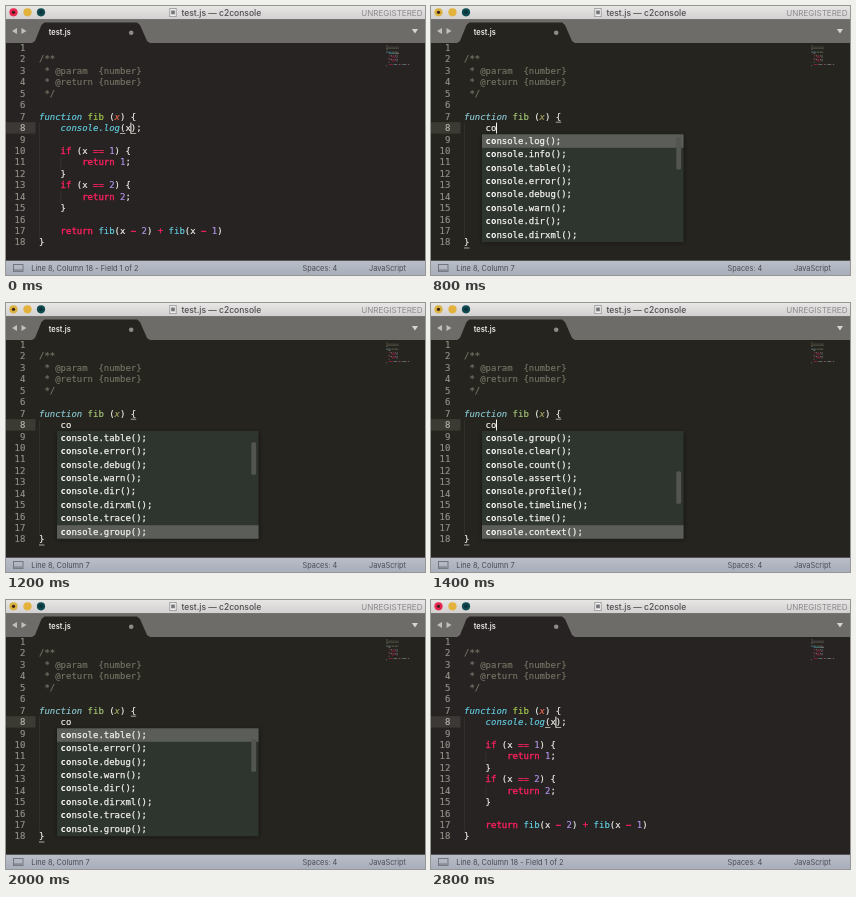
Recreate the animation shown at these times as an HTML page with a canvas. Size 419 by 269 pixels, loop 2900 ms.

```html
<!DOCTYPE html>
<html lang="en">
<head>
<meta charset="utf-8">
<title>Editor autocomplete</title>
<style>
html, body { margin: 0; width: 100%; height: 100%; overflow: hidden; background: #262421; }
canvas { display: block; width: 419px; height: 269px; }
</style>
</head>
<body>
<canvas id="stage"></canvas>
<script>
const W = 419, H = 269, LOOP = 2900, STEP = 100;
const canvas = document.getElementById('stage');
const ctx = canvas.getContext('2d');
const ratio = window.devicePixelRatio || 1;
canvas.width = W * ratio;
canvas.height = H * ratio;

const MONO = '"DejaVu Sans Mono", monospace';
const SANS = 'Inter, sans-serif';
const CHAR = 5.4, LINE = 11.44, LEFT = 33, FIRST = 41.8;

// The picture is warmer while the finished code shows, cooler while completing.
const base = { text: '#f2f2ec', pink: '#f3205c', violet: '#b394ec', comment: '#757364', lamp: '#0f4a50' };
const WARM = { ...base, back: '#272322', cyan: '#62d0e4', green: '#a9d050', arg: '#ee6a50', close: '#e8264f', gutter: '#3b3836' };
const COOL = { ...base, back: '#25241f', cyan: '#8ccbd6', green: '#a8c878', arg: '#a9a765', close: '#d9b13f', gutter: '#3b3b33' };
let C = WARM;

const source = [
  '', '/**', ' * @param  {number}', ' * @return {number}', ' */', '',
  'function fib (x) {', '', '',
  '    if (x == 1) {', '        return 1;', '    }',
  '    if (x == 2) {', '        return 2;', '    }', '',
  '    return fib(x − 2) + fib(x − 1)', '}'
];
const methods = ('log info table error debug warn dir dirxml trace group clear count ' +
  'assert profile timeline time context memory groupCollapsed groupEnd ' +
  'markTimeline profileEnd timelineEnd').split(' ');
const ROWS = 8, ROW = 13.4, POP = { x: 51, y: 128, w: 201.5 };

function rect(x, y, w, h, color) {
  ctx.fillStyle = color;
  ctx.fillRect(x, y, w, h);
}

function shape(points, color) {
  ctx.beginPath();
  points.forEach(([x, y]) => ctx.lineTo(x, y));
  ctx.closePath();
  ctx.fillStyle = color;
  ctx.fill();
}

function disc(x, y, r, color) {
  ctx.beginPath();
  ctx.arc(x, y, r, 0, Math.PI * 2);
  ctx.fillStyle = color;
  ctx.fill();
}

function fade(top, bottom, from, to) {
  const shade = ctx.createLinearGradient(0, top, 0, bottom);
  shade.addColorStop(0, from);
  shade.addColorStop(1, to);
  return shade;
}

function label(text, x, y, size, color, weight = 400, align = 'left') {
  ctx.font = `${weight} ${size}px ${SANS}`;
  ctx.textAlign = align;
  ctx.textBaseline = 'alphabetic';
  ctx.fillStyle = color;
  ctx.fillText(text, x, y);
}

function mono(text, x, middle, color, style = '', heavy = 0.15) {
  ctx.font = `${style} 8.97px ${MONO}`;
  ctx.textAlign = 'left';
  ctx.textBaseline = 'alphabetic';
  ctx.fillStyle = ctx.strokeStyle = color;
  ctx.fillText(text, x, middle + 3.2);
  if (heavy) {
    ctx.lineWidth = heavy;
    ctx.strokeText(text, x, middle + 3.2);
  }
}

const lineY = row => FIRST + row * LINE;
const colX = col => LEFT + col * CHAR;

function tokens(text, row) {
  if (row >= 1 && row <= 4) return [{ text, col: 0, color: C.comment }];
  const pattern = /function|console\.log|\bif\b|return|fib|==|[−+]|\d|\bx\b|[^\s]/g;
  return [...text.matchAll(pattern)].map(({ 0: word, index: col }) => {
    let color = C.text, style = '';
    if (/^(function|console)/.test(word)) [color, style] = [C.cyan, 'italic'];
    else if (/^(if|return|==|−|\+)$/.test(word)) color = C.pink;
    else if (word === 'fib') color = row === 6 ? C.green : C.cyan;
    else if (/\d/.test(word)) color = C.violet;
    else if (word === 'x' && row === 6) [color, style] = [C.arg, 'italic'];
    return { text: word, col, color, style };
  });
}

// Highlighted entry while the popup is open, driven by held arrow keys.
function selection(t) {
  if (t < 1000) return 0;
  if (t < 1100) return 1;
  if (t < 1500) return Math.round(1 + (t - 1000) * 0.0375);
  if (t < 1600) return 20;
  if (t < 1700) return 22;
  return Math.max(0, 17 - (t - 1700) / 20);
}

function scrollFor(t, chosen) {
  if (t < 1700) return Math.max(0, chosen - ROWS + 1);
  return Math.min(methods.length - ROWS, chosen);
}

function stateAt(t) {
  const s = { typed: 'console.log(x);', caret: 17, field: true, saved: t >= 300 && t < 600,
    popup: t >= 700 && t < 2300, blink: true };
  if (t >= 600 && t < 2300) {
    s.typed = t < 700 ? '' : t < 800 ? 'c' : 'co';
    s.caret = 4 + s.typed.length;
    s.field = false;
    s.blink = t < 900 || (t >= 1300 && t < 1600) || t >= 2100;
  } else if (t >= 2300 && t < 2500) {
    s.typed = 'console.log();';
    s.caret = 16;
  }
  if (s.popup) {
    s.chosen = selection(t);
    s.scroll = scrollFor(t, s.chosen);
  }
  return s;
}

function drawTitle(s) {
  rect(0, 0, W, 13.5, fade(0, 13.5, '#e8e6e5', '#d2d0d0'));
  disc(7.5, 6.3, 4.1, C.close);
  disc(21.5, 6.3, 4.1, '#e3b23d');
  disc(35, 6.3, 4.1, C.lamp);
  disc(35, 6.3, 1.8, '#0b3238');
  if (!s.saved) disc(7.5, 6.3, 1.6, '#3a1f1a');
  rect(163.5, 2, 7, 9, '#88888a');
  rect(164.2, 2.7, 5.6, 7.6, '#f0f0f0');
  rect(165.2, 4.5, 3.6, 3.8, '#75757a');
  label('test.js — c2console', 175.4, 9.5, 8.5, '#4b4b4d', 500);
  label('UNREGISTERED', 416.5, 9.6, 8.05, '#8b8a8d', 400, 'right');
}

function drawTabs(s) {
  rect(0, 13.5, W, 23.5, '#6d6c69');
  shape([[26, 37], [29, 35], [35.5, 19], [38.5, 16.5], [131, 16.5], [134, 19], [141, 35], [144, 37]], C.back);
  shape([[6, 25], [11, 22], [11, 28]], '#c0c0bc');
  shape([[20.5, 25], [15.5, 22], [15.5, 28]], '#c0c0bc');
  shape([[405.8, 23], [412, 23], [409, 27.5]], '#d4d4d0');
  label('test.js', 42.8, 29.2, 7.4, '#f0f0ee', 600);
  if (s.saved) {
    ctx.strokeStyle = '#b3b3af';
    ctx.lineWidth = 1;
    ctx.beginPath();
    ctx.moveTo(123.2, 24.7); ctx.lineTo(127.2, 28.7);
    ctx.moveTo(127.2, 24.7); ctx.lineTo(123.2, 28.7);
    ctx.stroke();
  } else disc(125.2, 26.7, 2.3, '#8b8b87');
}

function underline(col, row) {
  rect(colX(col), lineY(row) + 5.3, CHAR, 0.8, '#c9c9c2');
}

function drawCode(s) {
  rect(0, lineY(7) - LINE / 2, 29.5, LINE, C.gutter);
  rect(LEFT, lineY(7) - 5, 0.6, LINE * 10, '#3b3a35');
  for (const row of [10, 13]) rect(colX(4), lineY(row) - 5, 0.6, LINE, '#3b3a35');

  source.forEach((line, row) => {
    const text = row === 7 ? '    ' + s.typed : line;
    const number = String(row + 1);
    mono(number, 19.3 - number.length * CHAR, lineY(row), row === 7 ? '#b8b8b0' : '#92928a');
    for (const k of tokens(text, row)) {
      mono(k.text, colX(k.col), lineY(row), k.color, k.style, k.color === C.pink ? 0.4 : 0.15);
      rect(380 + k.col * 0.68, 38.2 + row * 1.25, k.text.length * 0.68, 0.8, k.color + '88');
    }
  });

  if (s.field) {
    underline(15, 7);
    underline(s.caret, 7);
  } else {
    underline(17, 6);
    underline(0, 17);
  }
  if (s.blink) rect(colX(s.caret) - 0.4, lineY(7) - 5.3, 1, 11, '#f8f8f2');
}

function drawPopup(s) {
  ctx.save();
  ctx.shadowColor = 'rgba(0, 0, 0, 0.45)';
  ctx.shadowBlur = 5 * ratio;
  ctx.shadowOffsetY = ratio;
  rect(POP.x, POP.y, POP.w, ROWS * ROW + 1, '#2e342e');
  ctx.restore();
  const top = POP.y + 0.4;
  rect(POP.x, top + (s.chosen - s.scroll) * ROW, POP.w, ROW, '#5b5d58');
  methods.slice(s.scroll, s.scroll + ROWS).forEach((name, i) => {
    const y = top + (i + 0.5) * ROW - 0.6;
    mono('co', 54.6, y, '#ffffff', 'bold', 0);
    mono(`nsole.${name}();`, 54.6 + 2 * CHAR, y, C.text, '', 0.25);
  });
  const travel = s.scroll / (methods.length - ROWS);
  ctx.beginPath();
  ctx.roundRect(245.3, 131 + 62 * travel, 4.8, 32.5, 1.5);
  ctx.fillStyle = '#525550';
  ctx.fill();
}

function drawStatus(s) {
  rect(0, 254.7, W, 15, fade(254.7, H, '#b9bec8', '#a8aeba'));
  ctx.strokeStyle = '#6c7078';
  ctx.lineWidth = 0.9;
  ctx.strokeRect(7.5, 258.5, 9.5, 7);
  rect(8, 263.3, 8.5, 2, '#878c96');
  const ink = '#484b53';
  let text = `Line 8, Column ${s.caret + 1}`;
  if (s.field) text += ' - Field 1 of 2';
  if (s.saved) text += '; Saved ~/Desktop/c2console/test.js (UTF-8)';
  label(text, 25.2, 264.6, 7.42, ink);
  label('Spaces: 4', s.saved ? 362.5 : 296.5, 264.6, 7.35, ink);
  if (!s.saved) label('JavaScript', 363, 264.6, 7.35, ink);
}

function draw(now) {
  const t = Math.floor((now % LOOP) / STEP) * STEP;
  const s = stateAt(t);
  C = s.field ? WARM : COOL;
  ctx.setTransform(ratio, 0, 0, ratio, 0, 0);
  rect(0, 0, W, H, C.back);
  drawTitle(s);
  drawTabs(s);
  drawCode(s);
  if (s.popup) drawPopup(s);
  drawStatus(s);
}

const start = performance.now();
function frame() {
  draw(performance.now() - start);
  requestAnimationFrame(frame);
}
frame();
</script>
</body>
</html>
```
